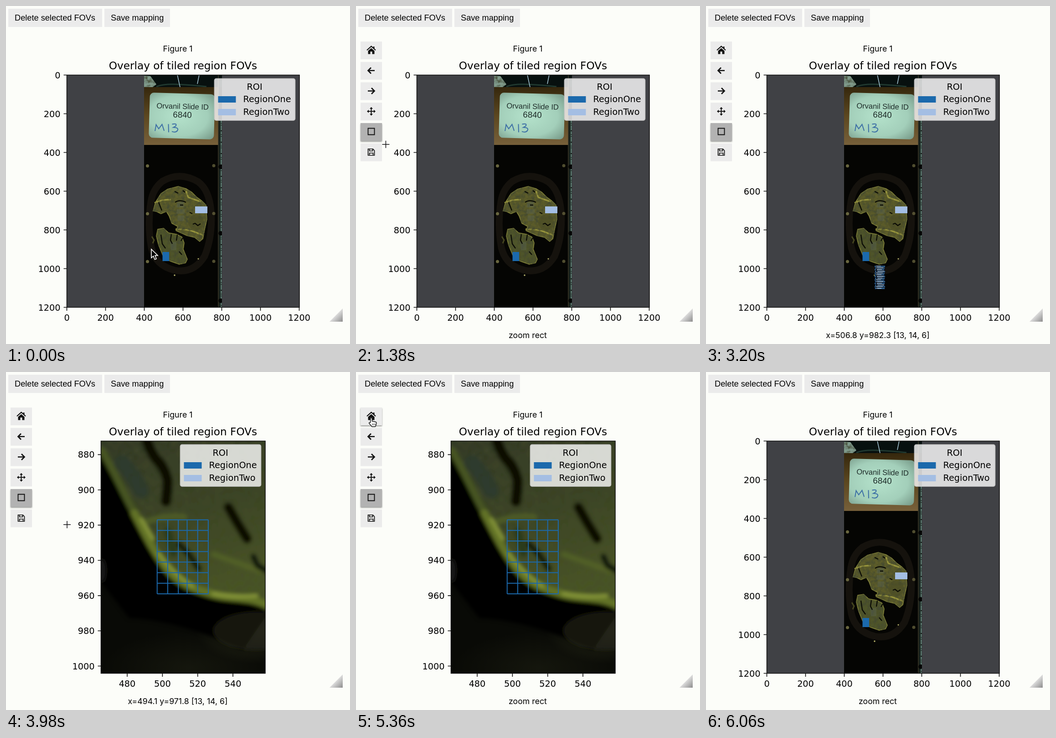
An HTML page that plays this animation: 755x742 px, repeating every 6.08 s.

```html
<!DOCTYPE html>
<html lang="en">
<head>
<meta charset="utf-8">
<title>Overlay of tiled region FOVs</title>
<style>
html, body { margin: 0; width: 100%; height: 100%; overflow: hidden; background: #fcfdf9; }
svg { display: block; }
.ui { font: 18.2px "Liberation Sans", Arial, sans-serif; }
.note { font: 17.7px Inter, sans-serif; text-anchor: middle; }
.plot { font: 19.25px "DejaVu Sans", sans-serif; }
.line { fill: none; stroke: #111; }
</style>
</head>
<body>
<svg id="stage" width="755" height="742" viewBox="0 0 755 742">
  <defs>
    <linearGradient id="grip" x1="0" y1="0" x2="1" y2="1">
      <stop offset=".45" stop-color="#e4e4e4"/><stop offset="1" stop-color="#8c8c8c"/>
    </linearGradient>
    <linearGradient id="card" x1="0" y1="0" x2="0" y2="1">
      <stop offset="0" stop-color="#35270d"/><stop offset=".5" stop-color="#5c4720"/><stop offset="1" stop-color="#77603a"/>
    </linearGradient>
    <radialGradient id="paper" cx=".45" cy=".5" r=".75">
      <stop offset="0" stop-color="#b4e2cb"/><stop offset=".6" stop-color="#a3cfba"/><stop offset="1" stop-color="#739584"/>
    </radialGradient>
    <radialGradient id="haze">
      <stop offset="0" stop-color="#2a2c1a"/><stop offset="1" stop-color="#2a2c1a" stop-opacity="0"/>
    </radialGradient>
    <linearGradient id="flesh" x1="0" y1="0" x2=".3" y2="1">
      <stop offset="0" stop-color="#2b3320"/><stop offset=".55" stop-color="#394320"/><stop offset="1" stop-color="#4a5723"/>
    </linearGradient>
    <filter id="mottle" x="-5%" y="-5%" width="110%" height="110%">
      <feTurbulence type="fractalNoise" baseFrequency=".13" numOctaves="3" seed="4"/>
      <feColorMatrix values="0 0 0 0 .06  0 0 0 0 .07  0 0 0 0 .03  2.4 0 0 0 -.9"/>
      <feComposite in2="SourceGraphic" operator="in" result="spots"/>
      <feMerge><feMergeNode in="SourceGraphic"/><feMergeNode in="spots"/></feMerge>
    </filter>
    <filter id="soft" x="-10%" y="-10%" width="120%" height="120%"><feGaussianBlur stdDeviation="4"/></filter>
    <filter id="drop" x="-30%" y="-30%" width="160%" height="170%">
      <feDropShadow dx="0" dy="2" stdDeviation="1.8" flood-opacity=".4"/>
    </filter>
    <clipPath id="slideClip"><path d="M303 151H474V661H303Z"/></clipPath>
    <clipPath id="zoomClip"><path d="M208.5 151H569V662H208.5Z"/></clipPath>
  </defs>

  <g class="ui">
    <rect x="5" y="6" width="206" height="40" fill="#ebebeb"/>
    <rect x="216" y="6" width="144" height="40" fill="#ebebeb"/>
    <text x="19" y="32">Delete selected FOVs</text>
    <text x="230" y="32">Save mapping</text>
  </g>
  <text class="note" x="377" y="99.5">Figure 1</text>
  <text class="plot" x="388.5" y="139" text-anchor="middle" style="font-size:23.2px">Overlay of tiled region FOVs</text>
  <path d="M739 664V693H710Z" fill="url(#grip)"/>

  <g id="full">
    <path d="M133 151H644V661H133Z" fill="#404145"/>
    <g clip-path="url(#slideClip)">
      <path d="M303 151H474V661H303Z" fill="#050503"/>
      <path d="M303 151H474V178H303Z" fill="#07100f"/>
      <path d="M303 153L317 154L330 172L322 178H303Z" fill="#7f9a8b" filter="url(#mottle)"/>
      <path d="M330 177Q345 171 375 172T440 177" class="line" style="stroke:#20382f" stroke-width="3"/>
      <path d="M376 151L382 178M424 151L420 171" class="line" style="stroke:#a9c9d8" stroke-width="1.5"/>
      <path d="M303 178H466V305H303Z" fill="url(#card)"/>
      <g transform="rotate(1.6 386 242)">
        <rect x="314.500" y="192" width="143" height="99" rx="9" fill="url(#paper)"/>
        <g class="ui" fill="#1d2b28" text-anchor="middle" style="font-size:16.5px">
          <text x="387" y="226">Orvanil Slide ID</text>
          <text x="387" y="245" style="font-size:18.5px">6840</text>
        </g>
        <path d="M328 276L330 262L336 271L343 261L348 275M357 260L358 278M365 260Q377 257 373 264L368 267Q381 267 377 274Q373 279 365 276"
          class="line" style="stroke:#3c6fa5" stroke-width="2"/>
      </g>
      <path d="M343 385Q381 362 422 386Q446 404 450 450Q454 505 436 549Q412 588 370 580Q328 570 319 530Q310 480 318 430Q322 402 343 385Z"
        class="line" style="stroke:#15120d" stroke-width="15"/>
      <g id="pins" fill="#69663f"></g>
      <g filter="url(#mottle)" stroke="#85853a" stroke-width="1.6" stroke-linejoin="round">
        <path fill="#5b5c2c" d="M323 450L328 431L340 412L355 402L378 396L395 401L408 409L419 420L430 428L439 437L441 468L436 490L432 511L425 517L414 508L397 504L373 493L377 484L364 477L358 461L352 451L340 456L330 451Z"/>
        <path fill="#505429" d="M333 490L346 488L357 498L374 501L386 507L391 520L389 534L398 556L394 564L380 567L360 560L344 547L335 525L330 505Z"/>
        <path d="M326 432Q345 424 362 425M395 406L400 420L428 430M372 490Q396 489 414 496L432 503" fill="none" stroke="#9a973d" stroke-width="3"/>
      </g>
      <path d="M376 430h15v12h-17zM375 446h17v10h-18zM377 460h14v12h-15zM360 518h14v18h-12z" fill="#59645a" opacity=".35"/>
      <circle cx="417" cy="475" r="17" fill="#4c4d25" opacity=".7"/>
      <path d="M335 431L342 449M370 407L378 411M388 405L393 409M371 431Q381 424 395 431M382 437H389M403 453L409 456M410 479L415 477L421 482L427 478M363 501L361 514L365 522M376 502L374 515M340 502L343 522L350 532M388 509L384 516M380 539L386 546"
        class="line" style="stroke:#0b0c05" stroke-width="2.3"/>
      <path d="M320 506L325 514L322 521" class="line" style="stroke:#45451f" stroke-width="3"/>
      <g fill="#b9b66d"><circle cx="422" cy="555" r="1.500"/><circle cx="370" cy="591" r="1.700"/></g>
      <path d="M466 151V661" stroke="#413e2e" stroke-width="1.500"/>
      <path d="M470 250V661" stroke="#1c2923" stroke-width="5"/>
      <path d="M472.500 250V661" stroke="#71948a" stroke-width="2" stroke-dasharray="7 1 3 1 11 2"/>
      <g fill="#050605"><circle cx="471" cy="353" r="5"/><circle cx="471" cy="499" r="5"/><circle cx="471" cy="647" r="5"/></g>
    </g>
    <path d="M343.500 540H358V560H343.500Z" fill="#1b69ac"/>
    <path d="M415 440H442V455H415Z" fill="#a4bee3"/>
  </g>

  <g id="zoomed">
    <g clip-path="url(#zoomClip)">
      <path d="M208 151H569V662H208Z" fill="#090a06"/>
      <ellipse cx="545" cy="565" rx="130" ry="75" fill="url(#haze)"/>
      <ellipse cx="400" cy="650" rx="190" ry="80" fill="url(#haze)" opacity=".35"/>
      <g filter="url(#soft)">
        <path d="M200 165C235 215 252 262 278 310S318 402 350 438S400 482 450 494S530 492 580 522L520 610Q380 545 270 540L200 450Z" fill="#020302"/>
        <ellipse cx="211" cy="436" rx="9" ry="26" fill="#171812"/>
        <ellipse cx="550" cy="568" rx="95" ry="42" fill="#222418" opacity=".7"/>
        <g filter="url(#mottle)">
          <path d="M200 140V165C235 215 252 262 278 310S318 402 350 438S400 482 450 494S530 492 580 522V140Z" fill="url(#flesh)"/>
        </g>
        <g fill="none" stroke-linecap="round">
          <path d="M210 172C236 215 256 262 282 310" stroke="#465522" stroke-width="15"/>
          <path d="M282 310C304 352 326 397 352 430S405 474 450 487S530 490 575 513" stroke="#627227" stroke-width="17"/>
          <path d="M297 323L322 366M335 398Q371 447 410 470M455 487Q500 496 550 491" stroke="#88993a" stroke-width="7"/>
          <path d="M310 328Q350 314 392 318M455 400Q510 420 560 437" stroke="#586728" stroke-width="12" opacity=".7"/>
          <path d="M255 200Q282 229 296 260" stroke="#2c3a30" stroke-width="36" opacity=".8"/>
          <path d="M309 148Q317 178 334 196T355 244L351 284" stroke="#070906" stroke-width="23"/>
          <path d="M488 297L507 330L529 366" stroke="#080a05" stroke-width="21"/>
          <path d="M543 405L552 425L575 438" stroke="#10130a" stroke-width="13"/>
          <path d="M380 378L401 400L423 432" stroke="#151b0c" stroke-width="14"/>
          <path d="M355 350L368 397" stroke="#2c3a1c" stroke-width="18"/>
        </g>
      </g>
    </g>
    <path id="grid" class="line" style="stroke:#1b69ac" stroke-width="2"/>
  </g>

  <path id="band" class="line" style="stroke:#aaa" stroke-dasharray="3 3"/>
  <g id="toolbar"></g>
  <text id="message" class="note" x="377" y="729"></text>

  <g id="cursor">
    <path id="arrow" d="M0 0V19L4.400 14.900L7.500 22.500L11 21L8 13.600H14Z" stroke="#fff" stroke-width="1.600"/>
    <g id="cross">
      <path d="M-9 0H9M0-9V9" stroke="#fff" stroke-width="3.600"/>
      <path d="M-8 0H8M0-8V8" stroke="#111" stroke-width="1.500"/>
    </g>
    <g id="hand" fill="#fff" stroke="#111" stroke-width="1.400" stroke-linejoin="round">
      <path d="M-1.800 10V1.500a1.800 1.800 0 0 1 3.600 0V7l7.500 1.500q2.300.6 2 3l-.8 4-1.600 3.500H1.500L-4.800 11.500q-.6-2.600 3-1.500Z"/>
      <path d="M2.500 12v4M5.500 12v4M8.500 12v4" stroke-width="1"/>
    </g>
    <g id="glitch"></g>
  </g>
</svg>
<script>
const $ = id => document.getElementById(id);
const show = (id, on) => $(id).style.display = on ? '' : 'none';
const range = (n, start = 0, step = 1) => Array.from({ length: n }, (_, i) => start + i * step);
const LOOP = 6080;

// Frame, ticks and legend of one view
function axes(id, left, right, xTicks, yTicks, toX, toY) {
  const legend = right - 186.5;
  const swatch = (y, color, name) =>
    `<rect x="${legend + 8}" y="${y}" width="39" height="14" fill="${color}"/>
     <text x="${legend + 63}" y="${y + 13}">${name}</text>`;
  const marks = xTicks.map(v => `M${toX(v)} 662v7`).join('') + yTicks.map(v => `M${left} ${toY(v)}h-7`).join('');
  $(id).insertAdjacentHTML('beforeend', `<g class="plot">
    <path d="M${left} 151.5H${right}V661.5H${left}Z${marks}" class="line" stroke-width="1.6"/>
    <g text-anchor="middle">${xTicks.map(v => `<text x="${toX(v)}" y="690.5">${v}</text>`).join('')}</g>
    <g text-anchor="end">${yTicks.map(v => `<text x="${left - 14}" y="${toY(v) + 7}">${v}</text>`).join('')}</g>
    <rect x="${legend}" y="159.5" width="177" height="91.5" rx="4" fill="#fff" fill-opacity=".8" stroke="#ccc" stroke-opacity=".8" stroke-width="1.8"/>
    <text x="${legend + 88}" y="183.500" text-anchor="middle">ROI</text>
    ${swatch(198, '#1b69ac', 'RegionOne')}${swatch(226, '#a4bee3', 'RegionTwo')}</g>`);
}
const fullTicks = range(7, 0, 200);
axes('full', 133.5, 644, fullTicks, fullTicks, v => 133.5 + v * .425, v => 151.5 + v * .425);
const zoomX = v => 266 + (v - 480) * 3.868, zoomY = v => 181.4 + (v - 880) * 3.868;
axes('zoomed', 208.5, 569, range(4, 480, 20), range(7, 880, 20), zoomX, zoomY);

$('grid').setAttribute('d',
  [497, 503, 509, 514, 520, 526].map(v => `M${zoomX(v)} ${zoomY(917)}V${zoomY(959)}`).join('') +
  range(8, 917, 6).map(v => `M${zoomX(497)} ${zoomY(v)}H${zoomX(526)}`).join(''));

$('pins').innerHTML = [351, 456, 561].map(y =>
  `<circle cx="310.5" cy="${y}" r="3.5"/><circle cx="456" cy="${y - .5}" r="3.5" opacity=".75"/>`).join('');

$('glitch').innerHTML = range(14).map(i => `<g transform="translate(0 ${i * 3.75 - 6.5})">
  <path d="M0 0H23" stroke="#0a1020" stroke-width="3"/>
  <path d="M${i % 2} 0h3m2 0H${23 - i % 3}" stroke="#4a9be0" stroke-width="1.6"/>
  <path d="M${3 + i % 4} -.5H${14 + i * 5 % 8}" stroke="#e9f3ff"/></g>`).join('');

const icons = [
  ['M-9.500 0L0-8.500L9.500 0', 'M-7 1.500L0-4.500L7 1.500V8.500H2V3H-2V8.500H-7ZM4-8H7V-2L4-5Z', 2.2],
  ['M7.500 0H-6M-.5-6.500L-7 0L-.5 6.500', '', 2.7],
  ['M-7.500 0H6M.5-6.500L7 0L.5 6.500', '', 2.7],
  ['M0-7V7M-7 0H7', 'M0-9.500l3.500 4h-7zM0 9.500l3.500-4h-7zM-9.500 0l4-3.500v7zM9.500 0l-4-3.500v7z', 2],
  ['M-7-7.500H7V6.500H-7Z', '', 1.9],
  ['M-7-7H3.500L7-3.500V7H-7ZM-4-7V-2.500H3V-7M-4 7V2H4V7', '', 1.7]
];
const buttonY = i => 97 + i * 44.75;
$('toolbar').innerHTML = icons.map(([line, fill, width], i) => `<g transform="translate(33.5 ${buttonY(i)})">
  <rect x="-23.5" y="-19" width="47" height="39"/>
  <path d="${line}" class="line" stroke-width="${width}"/><path d="${fill}" fill="#111"/></g>`).join('');
const buttons = [...$('toolbar').querySelectorAll('rect')];

// Pointer stops: time, x, y
const stops = [
  [0, 319, 534], [680, 99, 353], [1000, 34, 278], [1250, 34, 278], [1900, 332, 522], [2350, 332, 522],
  [3050, 370, 578], [3450, 370, 578], [3980, 134, 335], [4250, 134, 335], [4850, 33.5, 101], [5560, 33.5, 101], [5780, -25, 125]
];
function pointer(t) {
  const n = stops.findIndex(s => s[0] > t);
  if (n < 0) return [-50, 125];
  const [t0, x0, y0] = stops[n - 1], [t1, x1, y1] = stops[n];
  const p = (t - t0) / (t1 - t0), e = p * p * (3 - 2 * p);
  return [x0 + (x1 - x0) * e, y0 + (y1 - y0) * e];
}

function message(t, x, y) {
  if (t < 1120) return '';
  if (t >= 4600) return 'zoom rect';
  if (t >= 3640) return 'x=494.1 y=971.8 [13, 14, 6]';
  if (t >= 3100) return 'x=506.8 y=982.3 [13, 14, 6]';
  if (x < 133.5) return 'zoom rect';
  const rgb = t > 1850 && t < 2450 ? '[52, 60, 23]' : '[13, 14, 6]';
  return `x=${Math.round((x - 133.5) / .425)}. y=${Math.round((y - 151.5) / .425)}. ${rgb}`;
}

const ramp = (t, a, b) => Math.min(1, Math.max(0, (t - a) / (b - a)));

function draw(t) {
  const [x, y] = pointer(t);
  const zoomed = t >= 3340 && t < 5460;
  show('zoomed', zoomed);
  show('full', !zoomed);
  $('toolbar').setAttribute('opacity', ramp(t, 640, 900) - ramp(t, 5800, 6040));
  $('message').textContent = message(t, x, y);

  const overBar = x > 9 && x < 58 && t > 700;
  buttons.forEach((b, i) => {
    const active = i === 4 && t >= 1120;
    const hover = overBar && Math.abs(y - buttonY(i)) < 20;
    b.setAttribute('fill', active ? '#b2b2b2' : '#ebebeb');
    b.setAttribute('filter', active || hover ? 'url(#drop)' : 'none');
  });

  const glitch = t >= 3120 && t < 3340;
  const kind = glitch ? 'glitch' : overBar ? 'hand' : t >= 1120 && t < 5000 ? 'cross' : 'arrow';
  for (const id of ['arrow', 'cross', 'hand', 'glitch']) show(id, id === kind);
  $('cursor').setAttribute('transform', `translate(${x} ${y})`);

  const dragging = t > 2350 && t < 3080;
  show('band', dragging);
  if (dragging) $('band').setAttribute('d', `M332 522H${x}V${y}H332Z`);
}

const start = performance.now();
function tick() {
  draw((performance.now() - start) % LOOP);
  requestAnimationFrame(tick);
}
tick();
</script>
</body>
</html>
```
